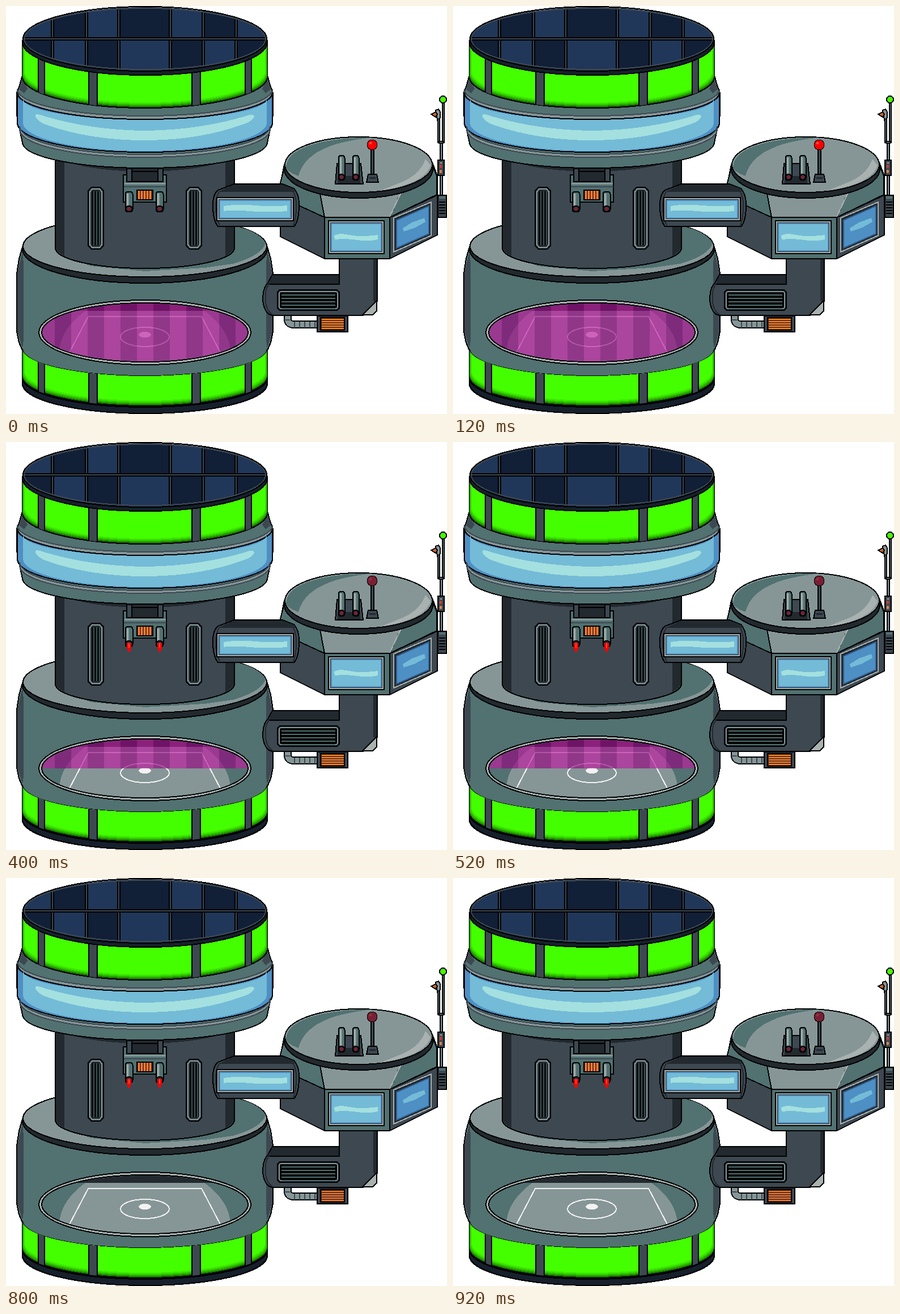
Animation, 778 px wide and 720 px high, one loop 1 s. Source, as an HTML page:

```html
<!DOCTYPE html>
<html lang="en">
<head>
<meta charset="utf-8">
<title>Sci-fi arena station</title>
<style>
html, body { margin: 0; width: 100%; height: 100%; overflow: hidden; background: #fff; }
svg { display: block; width: 778px; height: 720px; shape-rendering: crispEdges; }
</style>
</head>
<body>
<svg id="stage" viewBox="0 0 778 720"></svg>
<script>
const C = {
  ink: '#000', dark: '#22292f', steel: '#3d4851', teal: '#527171', grey: '#869697',
  pale: '#a9b2b0', navy: '#111f37', blue: '#203759', rim: '#16202c', glass: '#74bbd7',
  deep: '#4e8fc4', shine: '#a4e0df', green: '#44ff00', orange: '#f08038', rust: '#6b2a18',
  maroon: '#7a1f33', chalk: '#f2f2f2'
};
const parts = [];
const add = s => parts.push(s);
const edge = s => s ? ` stroke="${s}" stroke-width="2"` : '';
const path = (d, fill, stroke) => add(`<path d="${d}" fill="${fill}"${edge(stroke)}/>`);
const line = (d, color, width = 2) =>
  add(`<path d="${d}" fill="none" stroke="${color}" stroke-width="${width}"/>`);
const rect = (x, y, w, h, fill, stroke, r = 0) =>
  add(`<rect x="${x}" y="${y}" width="${w}" height="${h}" rx="${r}" fill="${fill}"${edge(stroke)}/>`);
const oval = (x, y, rx, ry, fill, stroke) =>
  add(`<ellipse cx="${x}" cy="${y}" rx="${rx}" ry="${ry}" fill="${fill}"${edge(stroke)}/>`);
const open = (attrs = '') => add(`<g ${attrs}>`);
const close = () => add('</g>');

// Curved strip wrapped round the front of a drum
function bandPath(x0, x1, y0, ry0, y1, ry1) {
  const rx = (x1 - x0) / 2;
  return `M${x0} ${y0}A${rx} ${ry0} 0 0 0 ${x1} ${y0}L${x1} ${y1}A${rx} ${ry1} 0 0 1 ${x0} ${y1}Z`;
}
const band = (x0, x1, y0, ry0, y1, ry1, fill, stroke) =>
  path(bandPath(x0, x1, y0, ry0, y1, ry1), fill, stroke);

function glowBand(y0, ry0, y1, ry1, id) {
  add(`<clipPath id="${id}"><path d="${bandPath(29, 461, y0, ry0, y1, ry1)}"/></clipPath>`);
  band(29, 461, y0, ry0, y1, ry1, '#125000', C.ink);
  open(`clip-path="url(#${id})"`);
  ['#1f8a00', '#2bb400', '#35d600', '#3dee00', C.green].forEach((c, i) =>
    band(29 + i, 461 - i, y0, ry0, y1 - 2 - i * 2, ry1, c));
  for (const [x, w] of [[57, 11], [146, 15], [328, 15], [422, 11]])
    rect(x, y0, w, 130, C.steel, C.ink);
  close();
}

function pane(x, y, w, h) {
  rect(x, y, w, h, C.steel, C.ink);
  rect(x + 2, y + 2, w - 4, h - 4, C.dark, C.pale);
  rect(x + 5, y + 5, w - 10, h - 10, C.glass, C.deep);
}

function slot(x) {
  path(`M${x + 6} 320h15l6 6v97l-6 6h-15l-6 -6v-97Z`, C.steel, C.ink);
  path(`M${x + 7} 323h13l4 5v93l-4 5h-13l-4 -5v-93Z`, C.dark, C.grey);
  for (const dx of [7, 12, 17]) {
    rect(x + dx, 327, 2, 95, C.ink);
    rect(x + dx + 2, 327, 1, 95, C.teal);
  }
}

function barrel(x, y, h, w) {
  rect(x - w / 2, y, w, h, C.teal, C.ink, 4);
  rect(x - w / 2 + 2, y + 3, 4, h - 8, C.grey);
  rect(x - w / 2 + 2, y + 3, 2, h - 12, C.pale);
  oval(x, y + h - 5, w / 2, 5, C.dark, C.ink);
  oval(x, y + h - 5, 3, 3, C.maroon);
}

const flame = (x, y, h) => {
  path(`M${x - 4} ${y}h8v${h / 2}l-3 ${h / 2}h-2l-3 ${-h / 2}Z`, '#f00');
  rect(x - 1, y, 2, h / 2, '#ff4a30');
};

function base() {
  path('M29 425L23 446L19 472V574L23 594L29 608V667A216 52 0 0 0 461 667V608L467 594L471 574V472L467 446L461 425Z', C.teal, C.ink);
  path('M29 432L20 472V574L29 604L31 590V455Z', C.steel);
  path('M461 432L470 472V574L461 604L459 590V455Z', C.steel);
  oval(245, 429, 216, 60, C.dark, C.ink);
  oval(245, 424, 215, 54, C.grey, C.ink);
  path('M403 388Q447 398 458 418Q452 440 400 455L350 462L245 468L150 459L100 440L245 440L380 430Z', C.teal);
  glowBand(605, 48, 654, 52, 'lowGlow');
  band(29, 461, 656, 52, 666, 53, C.rim, C.ink);
}

function column() {
  path('M87 250V427A158 36 0 0 0 403 427V250Z', C.steel, C.ink);
  path('M88 250H103V441Q90 434 88 427Z', C.dark);
  path('M402 250H387V441Q400 434 402 427Z', C.dark);
  band(88, 402, 250, 34, 258, 34, C.dark);
  slot(145);
  slot(318);
}

function crown() {
  path('M29 122L24 140L19 153V192L23 214L29 241A216 45 0 0 0 461 241L467 214L471 192V153L466 140L461 122Z', C.teal, C.ink);
  path('M29 130L23 147L32 154L38 146Z', C.steel);
  path('M461 130L467 147L458 154L452 146Z', C.steel);
  band(20, 470, 147, 47, 152, 48, C.grey, C.steel);
  band(20, 470, 153, 47, 207, 51, C.deep, C.ink);
  band(30, 460, 164, 37, 206, 50, C.glass);
  path('M52 192Q56 190 66 194Q150 219 245 220Q340 219 424 194Q434 189 438 194Q438 202 418 209Q340 237 245 237Q150 237 72 210Q51 202 52 192Z', C.shine);
  band(24, 466, 212, 50, 218, 49, C.grey, C.steel);
  glowBand(66, 56, 125, 55, 'topGlow');
  oval(245, 64, 216, 58, C.rim, C.ink);

  add('<clipPath id="lid"><ellipse cx="245" cy="58" rx="215" ry="56"/></clipPath>');
  open('clip-path="url(#lid)"');
  const xs = [28, 82, 142, 199, 290, 348, 406, 464];
  for (let i = 0; i < 7; i++) for (let j = 0; j < 2; j++)
    rect(xs[i], j * 58, xs[i + 1] - xs[i], 60, (i + j) % 2 ? C.navy : C.blue, C.ink);
  for (const x of xs.slice(1, 7)) rect(x - 2, 0, 4, 118, C.steel, C.ink);
  rect(28, 56, 436, 4, C.steel, C.ink);
  close();
  oval(245, 58, 213, 54, 'none', C.steel);
  oval(245, 58, 215, 57, 'none', C.ink);
}

function arena() {
  oval(245, 576, 187, 57, C.pale, C.ink);
  oval(245, 576, 182, 52, C.teal, C.ink);
  add('<clipPath id="hall"><ellipse cx="245" cy="576" rx="181" ry="51"/></clipPath>');
  open('clip-path="url(#hall)"');
  rect(60, 520, 370, 18, C.dark);
  path('M94 610Q96 570 140 538H350Q394 570 396 610L370 632H120Z', C.grey);
  line('M112 611L145 548H345L378 611', C.chalk);
  oval(245, 584, 43, 17, 'none', C.chalk);
  oval(245, 580, 11, 5, C.chalk);
  add('<clipPath id="shutterCut"><rect id="shutter" x="60" y="520" width="370" height="112"/></clipPath>');
  open('clip-path="url(#shutterCut)" fill-opacity=".67"');
  for (let i = 0; i < 13; i++)
    rect(57 + i * 29, 520, 29, 112, i % 2 ? '#960a82' : '#be1ea0');
  close();
  close();
}

function pipe() {
  const hose = 'M497 546V554Q498 562 508 562H550';
  line(hose, C.ink, 14);
  line(hose, C.grey, 10);
  for (let x = 508; x < 550; x += 9) rect(x, 557, 2, 11, C.steel);
  rect(491, 553, 10, 2, C.steel);
  path('M588 440H655V521L630 546H470Q456 544 453 520Q453 496 462 489L470 474H588Z', C.steel, C.ink);
  path('M471 475H588V491H463Z', C.dark);
  line('M463 491H588V447', C.ink);
  rect(648, 447, 6, 74, C.dark);
  path('M654 520V538L647 545H629Z', C.pale, C.ink);
  line('M464 491Q456 500 458 520Q459 538 471 545', C.dark);
  rect(479, 501, 109, 36, C.dark, C.ink, 6);
  rect(482, 504, 103, 30, C.ink, C.grey, 4);
  for (let y = 509; y < 534; y += 6) rect(486, y, 95, 2, C.teal);
  rect(549, 547, 54, 28, C.steel, C.ink);
  rect(555, 550, 42, 22, C.rust, C.ink);
  open('id="vent"');
  for (let y = 552; y < 572; y += 4) rect(557, y, 39, 2, 'currentColor');
  close();
}

function pod() {
  path('M491 280L484 314V407L562 446H677L761 404V300L752 276Z', C.steel, C.ink);
  path('M491 285L484 312V337L562 373H677L760 333V300L752 280Z', C.teal, C.ink);
  path('M553 326H698L677 373H562Z', C.grey, C.ink);
  line('M698 327L677 372', C.pale);
  line('M562 373V446M677 446V373L760 334', C.ink);
  rect(563, 374, 113, 71, C.teal);
  pane(569, 379, 98, 58);
  path('M579 405Q588 400 606 404T656 404V412Q638 416 620 413T580 412Z', C.shine);
  path('M684 374L750 346V405L684 434Z', C.dark, C.pale);
  path('M689 378L746 353V402L689 427Z', C.deep, '#2d5f94');
  path('M700 392L716 382L738 374L740 381L722 391L702 398Z', C.glass);
  oval(622, 288, 131, 51, C.dark, C.ink);
  oval(622, 280, 130, 49, C.grey, C.ink);
  path('M749 281Q738 314 660 326L690 314Q730 300 740 270Z', C.pale);
  path('M494 285Q496 240 622 232H650Q530 242 516 300Q498 294 494 285Z', C.teal);

  path('M584 278H626L630 314H581Z', C.steel, C.ink);
  rect(585, 300, 40, 13, C.dark);
  open('id="podGuns"');
  barrel(592, 264, 43, 11);
  barrel(617, 264, 43, 11);
  close();
  open('id="podFire"');
  flame(592, 303, 12);
  flame(617, 303, 12);
  close();
  rect(644, 252, 5, 47, C.steel, C.ink);
  path('M639 297H654L657 311H636Z', C.steel, C.ink);
  rect(641, 302, 11, 3, C.dark);
  add('<circle id="lamp" cx="646" cy="245" r="9" stroke="#000" stroke-width="1"/>');
  add('<rect id="glint" x="641" y="240" width="4" height="4"/>');
}

function bridge() {
  path('M403 314H488L508 322Q517 332 517 350Q517 380 508 389H374Q365 378 365 352Q365 332 374 325Z', C.steel, C.ink);
  path('M403 315H488L507 323L510 328H374Z', C.dark);
  line('M376 328Q369 340 370 355Q370 374 377 387M507 328Q513 340 512 355Q512 374 507 387', C.dark);
  pane(372, 338, 135, 41);
  path('M384 353Q410 349 440 352T496 352V362Q460 365 430 362T384 362Z', C.shine);
}

function gun() {
  rect(222, 291, 46, 20, C.dark);
  line('M222 292H268M222 310H268', C.ink);
  rect(213, 287, 9, 24, C.steel, C.ink);
  rect(268, 287, 9, 24, C.steel, C.ink);
  path('M207 298H213V310H277V298H283V346H207Z', C.teal, C.ink);
  rect(209, 312, 73, 3, C.grey);
  rect(208, 318, 75, 2, C.steel);
  rect(231, 325, 28, 17, C.rust, C.ink);
  for (let x = 233; x < 258; x += 5) rect(x, 326, 3, 15, C.orange);
  open('id="mainGuns"');
  barrel(217, 328, 35, 13);
  barrel(271, 328, 35, 13);
  close();
  open('id="mainFire"');
  flame(217, 355, 16);
  flame(271, 355, 16);
  close();
}

function antenna() {
  rect(770, 171, 3, 70, C.grey, C.ink);
  rect(762, 184, 3, 57, C.grey, C.ink);
  rect(764, 239, 7, 3, C.pale, C.ink);
  rect(766, 242, 4, 94, C.grey, C.ink);
  oval(771, 165, 6, 6, C.green, C.ink);
  path('M758 184L763 182L766 187V197L761 201Z', C.grey, C.ink);
  path('M750 191L758 187L761 191L758 196Z', '#c8632f', C.ink);
  rect(762, 272, 11, 27, C.steel, C.ink);
  oval(767, 283, 2, 3, '#d23b30');
  oval(767, 292, 2, 3, C.orange);
  rect(766, 276, 3, 2, C.pale);
  rect(762, 334, 15, 39, C.steel, C.ink);
  for (let y = 345; y < 370; y += 5) rect(764, y, 11, 2, C.ink);
  rect(764, 336, 11, 4, C.teal);
}

[base, arena, column, crown, gun, pipe, antenna, pod, bridge].forEach(draw => draw());
const $ = id => document.getElementById(id);
$('stage').innerHTML = parts.join('');

// One row per 200 ms step: shutter edge, lamp lit, firing pair, vent colour
const steps = [
  [632, true, '', '#f08c24'],
  [605, true, 'pod', '#f8b818'],
  [576, false, 'main', '#ee8a2c'],
  [547, false, 'pod', '#f39a18'],
  [520, false, 'main', '#e0803a']
];

let shown = -1;
function show(time) {
  const n = Math.floor(time % 1000 / 200);
  if (n === shown) return;
  shown = n;
  const [bottom, lit, firing, heat] = steps[n];
  $('shutter').setAttribute('height', bottom - 520);
  $('lamp').setAttribute('fill', lit ? '#f00' : C.maroon);
  $('glint').setAttribute('fill', lit ? '#ff4a40' : '#8c3548');
  $('vent').style.color = heat;
  for (const k of ['pod', 'main']) {
    const on = firing === k;
    $(k + 'Fire').style.display = on ? '' : 'none';
    $(k + 'Guns').setAttribute('transform', `translate(0 ${on ? -2 : 0})`);
  }
}

const start = performance.now();
function loop() {
  show(performance.now() - start);
  requestAnimationFrame(loop);
}
loop();
</script>
</body>
</html>
```
